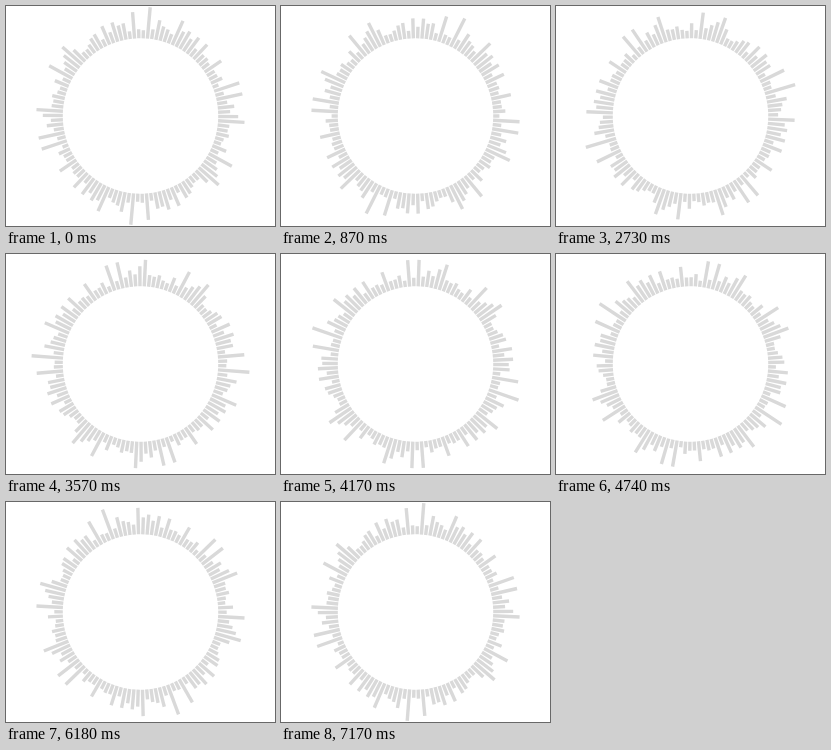
An HTML page with a canvas for the animation above (7200 ms loop, 269 px wide and 220 px high).

```html
<!DOCTYPE html>
<html lang="en">
<head>
<meta charset="utf-8">
<title>Rotating ring of bars</title>
<style>
  html, body { margin: 0; width: 100%; height: 100%; overflow: hidden; background: #fff; }
  canvas { display: block; width: 269px; height: 220px; }
</style>
</head>
<body>
<canvas id="stage"></canvas>
<script>
const W = 269, H = 220;
const LOOP = 7200, STEP = 30;
const HALF = 57;                      // bars in half the ring
const INNER = 77.7, BAR = 3.4;
const FIRST = 5.1 * Math.PI / 180;    // angle of the longest bar
const LONGEST = 31.5, TALL = 26.5, MEDIUM = 20;

const tall = [6, 21, 23, 28, 36, 40, 54];
const medium = [2, 8, 10, 12, 16, 27, 39, 48, 50];

function random(seed) {
  const x = Math.sin(seed * 12.9898 + 4.1) * 43758.5453;
  return x - Math.floor(x);
}

function barLength(i) {
  if (i === 0) return LONGEST;
  if (tall.includes(i)) return TALL;
  if (medium.includes(i)) return MEDIUM;
  return 6 + 11 * random(i);
}

const lengths = Array.from({ length: HALF }, (_, i) => barLength(i));

const canvas = document.getElementById("stage");
const ctx = canvas.getContext("2d");
const scale = window.devicePixelRatio || 1;
canvas.width = W * scale;
canvas.height = H * scale;

function draw(time) {
  // Both halves are alike, so half a turn closes the loop.
  const turn = Math.PI * Math.floor((time % LOOP) / STEP) * STEP / LOOP;

  ctx.setTransform(scale, 0, 0, scale, 0, 0);
  ctx.fillStyle = "#fff";
  ctx.fillRect(0, 0, W, H);

  ctx.translate(W / 2, H / 2);
  ctx.rotate(FIRST + turn);
  ctx.fillStyle = "#d9d9d9";
  for (let i = 0; i < 2 * HALF; i++) {
    const length = lengths[i % HALF];
    ctx.fillRect(-BAR / 2, -INNER - length, BAR, length);
    ctx.rotate(Math.PI / HALF);
  }
}

const start = performance.now();
function tick(now) {
  draw(Math.max(0, now - start));
  requestAnimationFrame(tick);
}
draw(0);
requestAnimationFrame(tick);
</script>
</body>
</html>
```
